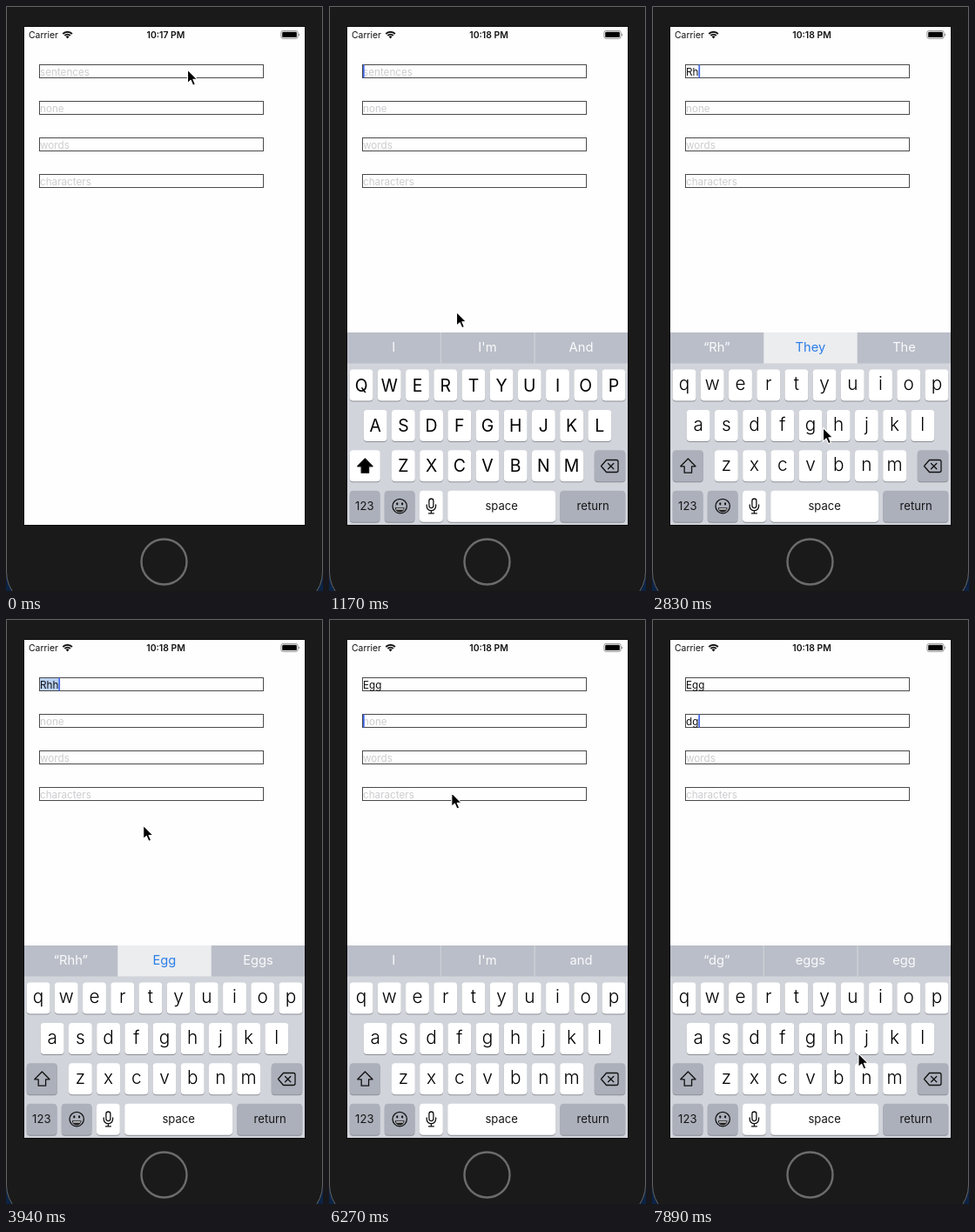
Recreate the animation shown at these times as an HTML page. Size 364 by 672 pixels, loop 8000 ms.

```html
<!DOCTYPE html>
<html lang="en">
<head>
<meta charset="utf-8">
<title>Auto-capitalisation keyboard</title>
<style>
  html, body { margin: 0; width: 100%; height: 100%; overflow: hidden; background: #0b2344; }
  svg { display: block; width: 364px; height: 672px; font-family: Inter, "Liberation Sans", sans-serif; }
  .mid { text-anchor: middle; }
  .status { font-size: 10.4px; fill: #111; }
  .field { font-size: 11.7px; }
  .hint { font-size: 14.7px; text-anchor: middle; }
  .label { font-size: 13.1px; text-anchor: middle; fill: #161616; }
  .line { fill: none; stroke: #111; stroke-width: 1.3; stroke-linejoin: round; stroke-linecap: round; }
  .popup { filter: drop-shadow(0 0.5px 1.5px rgba(0, 0, 0, .4)); }
</style>
</head>
<body>
<svg id="stage" viewBox="0 0 364 672">
  <defs><clipPath id="screen"><rect x="21" y="24" width="322" height="572"/></clipPath></defs>
  <path d="M.5 .5H363.5V650A40 40 0 0 1 323.5 690H40.5A40 40 0 0 1 .5 650Z" fill="#1a1a1a" stroke="#666"/>
  <rect x="20" y="23" width="324" height="574" fill="#0c0c0c"/>
  <rect x="21" y="24" width="322" height="572" fill="#fefefe"/>
  <circle cx="181.5" cy="638.5" r="26" fill="#1a1a1a" stroke="#6c6c6c" stroke-width="2.4"/>

  <text class="status" x="26" y="36.7">Carrier</text>
  <g fill="none" stroke="#111" stroke-width="1.9">
    <path d="M65.3 32A7.4 7.4 0 0 1 75.9 32M67.4 34A4.5 4.5 0 0 1 73.8 34"/>
    <path d="M70.6 37.4L68.7 35.3A2.7 2.7 0 0 1 72.5 35.3Z" fill="#111" stroke="none"/>
  </g>
  <text class="status mid" id="clock" x="183.5" y="36.7" font-weight="600"></text>
  <rect x="315.9" y="28.4" width="19.2" height="9" rx="2.2" fill="none" stroke="#777" stroke-width=".8"/>
  <rect x="317.2" y="29.7" width="16.6" height="6.4" rx="1.2" fill="#000"/>
  <path d="M336.2 31.4A1.7 1.7 0 0 1 336.2 34.4Z" fill="#777"/>

  <g id="fields"></g>
  <g clip-path="url(#screen)"><g id="keyboard"></g></g>
  <path id="pointer" d="M0 0V15.6L3.6 12.3L6.2 18.2L8.9 17L6.4 11.3H11.2Z" stroke="#fff" stroke-width="1.1" stroke-linejoin="round"/>
</svg>
<script>
const LOOP = 8000;
const FIELD_X = 39;
const ROWS = ["qwertyuiop", "asdfghjkl", "zxcvbnm"];
const ROW_X = [37.1, 53.2, 85.4];
const PITCH = 32.2;
const rowY = row => 417.5 + 46.4 * row;
const $ = id => document.getElementById(id);

function add(parent, tag, attrs = {}, text = "") {
  const node = document.createElementNS("http://www.w3.org/2000/svg", tag);
  for (const name in attrs) node.setAttribute(name, attrs[name]);
  node.textContent = text;
  return parent.appendChild(node);
}
function set(node, attrs) {
  for (const name in attrs) node.setAttribute(name, attrs[name]);
}
const show = (node, on) => set(node, { visibility: on ? "visible" : "hidden" });

// Input fields
const selection = add($("fields"), "rect", { x: FIELD_X, y: 68, height: 14.5, fill: "#b9d1f3" });
const fields = ["sentences", "none", "words", "characters"].map((hint, i) => {
  const y = 67.5 + 42 * i;
  add($("fields"), "rect", { x: 38.5, y, width: 257, height: 15, fill: "none", stroke: "#4a4a4a" });
  return { hint, y, text: add($("fields"), "text", { class: "field", x: FIELD_X, y: y + 12 }) };
});
const caret = add($("fields"), "rect", { width: 1.7, height: 15, fill: "#3f66ea" });

// Keyboard
const board = $("keyboard");
add(board, "rect", { x: 21, y: 375, width: 322, height: 221, fill: "#d1d4da" });
const hints = [0, 1, 2].map(i => ({
  cell: add(board, "rect", { x: 21 + 107.5 * i, y: 375, width: 107, height: 35.5 }),
  text: add(board, "text", { class: "hint", x: 74.3 + 107.6 * i, y: 396.8 })
}));
const dividers = [127.7, 235.9].map(x =>
  add(board, "rect", { x, y: 375, width: .8, height: 35.5, fill: "#d1d4da" }));

function key(x, row, width, fill) {
  const box = { x, y: rowY(row), width, height: 36, rx: 4 };
  add(board, "rect", { ...box, y: box.y + 1, fill: "#8b8e94" });
  return add(board, "rect", { ...box, fill });
}
const letters = {};
ROWS.forEach((row, r) => [...row].forEach((char, i) => {
  const x = ROW_X[r] + PITCH * i;
  key(x - 13.4, r, 26.8, "#fff");
  letters[char] = { x, row: r, text: add(board, "text", { class: "mid", x }) };
}));

const GREY = "#acb0bb";
const shiftKey = key(23.8, 2, 35, GREY);
const shiftArrow = add(board, "path", { class: "line", d: "M41.4 520L50 528.8H45.6V536.2H37.2V528.8H32.8Z" });
key(304.8, 2, 35.4, GREY);
add(board, "path", { class: "line", d: "M318.5 521.5H330Q332 521.5 332 523.5V533.5Q332 535.5 330 535.5H318.5L312.5 528.5ZM320.5 525.5L326.8 531.7M326.8 525.5L320.5 531.7" });
key(23.8, 3, 34.6, GREY);
key(63.8, 3, 34.6, GREY);
key(104, 3, 26.8, "#fff");
key(136.2, 3, 123.8, "#fff");
key(265.4, 3, 74.8, GREY);
[["123", 40.8], ["space", 198.2], ["return", 303.2]].forEach(([word, x]) =>
  add(board, "text", { class: "label", x, y: 579.2 }, word));

add(board, "circle", { class: "line", cx: 81.2, cy: 574.6, r: 8.2 });
add(board, "path", { d: "M75.8 576.2H86.6A5.4 5.2 0 0 1 75.8 576.2Z", fill: "#222" });
add(board, "path", { d: "M77 577.2H85.4V578.4H77.2Z", fill: "#fff" });
[78.3, 84.1].forEach(cx => add(board, "ellipse", { cx, cy: 571.8, rx: 1.1, ry: 1.6, fill: "#111" }));
add(board, "rect", { class: "line", x: 114.9, y: 566, width: 5, height: 10.6, rx: 2.5 });
add(board, "path", { class: "line", d: "M112.2 573V574.5A5.2 5.2 0 0 0 122.6 574.5V573M117.4 579.7V582.6M114.4 582.8H120.4" });

const popup = add(board, "g", { class: "popup" });
add(popup, "path", { fill: "#fff", d: "M-19 -56.5H19Q25 -56.5 25 -50.5V-17C25 -8 13.4 -8 13.4 3V32Q13.4 36 9.4 36H-9.4Q-13.4 36 -13.4 32V3C-13.4 -8 -25 -8 -25 -17V-50.5Q-25 -56.5 -19 -56.5Z" });
const popupText = add(popup, "text", { class: "mid", y: -21, "font-size": 32, "font-weight": 300 });

// Each entry overrides the state before it.
const EVENTS = [
  [0, { clock: "10:17 PM", texts: ["", ""], focus: -1, caps: true, pop: "", words: ["I", "I'm", "And"], hot: false, marked: false, blink: true }],
  [650, { clock: "10:18 PM", focus: 0 }],
  [1310, { blink: false }],
  [1740, { blink: true }],
  [2140, { pop: "r" }],
  [2280, { pop: "", texts: ["R", ""], caps: false, words: ["“R”", "Right", "Really"] }],
  [2690, { pop: "h" }],
  [2830, { pop: "", texts: ["Rh", ""], words: ["“Rh”", "They", "The"], hot: true }],
  [2950, { marked: true }],
  [3250, { pop: "h" }],
  [3390, { pop: "", texts: ["Rhh", ""], words: ["“Rhh”", "Egg", "Eggs"] }],
  [4070, { blink: false }],
  [4480, { blink: true }],
  [5020, { blink: false }],
  [5300, { blink: true }],
  [5970, { texts: ["Egg", ""], focus: 1, words: ["I", "I'm", "and"], hot: false, marked: false }],
  [6540, { blink: false }],
  [6820, { blink: true }],
  [7100, { texts: ["Egg", "d"], pop: "d" }],
  [7220, { pop: "", words: ["“d”", "do", "did"] }],
  [7360, { pop: "g" }],
  [7500, { pop: "", texts: ["Egg", "dg"], words: ["“dg”", "eggs", "egg"] }]
];

const TICKS = [0, 650, 770, 920, 1040, 1170, 1310, 1450, 1590, 1740,
  2140, 2280, 2420, 2550, 2690, 2830, 2950, 3100,
  3250, 3390, 3530, 3660, 3800, 3940, 4070, 4210, 4340, 4480, 4610, 4750, 4880, 5020, 5300, 5450,
  5970, 6110, 6250, 6390, 6540, 6680, 6820, 7100, 7220, 7360, 7500, 7640, 7890];

// Pointer stops: time, x, y
const PATH = [
  [0, 208.5, 73], [770, 208.5, 73], [1170, 146.5, 351.5], [1590, 136, 442],
  [2280, 136, 442], [2550, 168, 552], [2830, 196.5, 484.5], [3390, 196.5, 484.5],
  [4210, 144.5, 153], [5020, 144.5, 110], [5300, 144.5, 110], [5450, 144.5, 111.5],
  [5970, 144.5, 111.5], [6820, 130, 459.5], [7100, 165, 467], [7500, 186, 479], [7890, 237, 499]
];

function pointerAt(t) {
  const i = PATH.findIndex(stop => stop[0] > t);
  if (i < 0) return PATH[PATH.length - 1].slice(1);
  const [t0, x0, y0] = PATH[i - 1], [t1, x1, y1] = PATH[i];
  const u = (t - t0) / (t1 - t0), k = u * u * (3 - 2 * u);
  return [x0 + (x1 - x0) * k, y0 + (y1 - y0) * k];
}

function keyboardDrop(t) {
  if (t < 650) return 221;
  return t < 1040 ? 221 * Math.exp((620 - t) / 109) : 0;
}

function drawFields(s) {
  fields.forEach(({ text, hint }, i) => {
    const typed = s.texts[i];
    text.textContent = typed || hint;
    set(text, { fill: typed ? "#111" : "#cdcdd0" });
  });
  show(caret, s.focus >= 0 && s.blink);
  show(selection, s.marked);
  if (s.focus < 0) return;
  const width = s.texts[s.focus] ? fields[s.focus].text.getComputedTextLength() : 0;
  set(caret, { x: FIELD_X + width, y: fields[s.focus].y });
  set(selection, { width });
}

function drawKeyboard(s, t) {
  set(board, { transform: `translate(0 ${keyboardDrop(t)})` });
  hints.forEach(({ cell, text }, i) => {
    const hot = s.hot && i === 1;
    set(cell, { fill: hot ? "#ebedef" : "#babec8" });
    set(text, { fill: hot ? "#2b7de9" : "#fafbfc" });
    text.textContent = s.words[i];
  });
  dividers.forEach(line => show(line, !s.hot));
  for (const char in letters) {
    const { text, row } = letters[char];
    text.textContent = s.caps ? char.toUpperCase() : char;
    set(text, {
      y: rowY(row) + (s.caps ? 25 : 23.8),
      "font-size": s.caps ? 19.4 : 20.8,
      "font-weight": s.caps ? 400 : 300
    });
  }
  set(shiftKey, { fill: s.caps ? "#fff" : GREY });
  shiftArrow.style.fill = s.caps ? "#000" : "none";
  show(popup, s.pop);
  if (s.pop) {
    const { x, row } = letters[s.pop];
    set(popup, { transform: `translate(${x} ${rowY(row)})` });
    popupText.textContent = s.caps ? s.pop.toUpperCase() : s.pop;
  }
}

function render(time) {
  const t = TICKS.filter(tick => tick <= time).pop();
  const state = Object.assign({}, ...EVENTS.filter(e => e[0] <= t).map(e => e[1]));
  $("clock").textContent = state.clock;
  drawFields(state);
  drawKeyboard(state, t);
  set($("pointer"), { transform: `translate(${pointerAt(t)})` });
}

const start = performance.now();
function loop() {
  render((performance.now() - start) % LOOP);
  requestAnimationFrame(loop);
}
loop();
</script>
</body>
</html>
```
